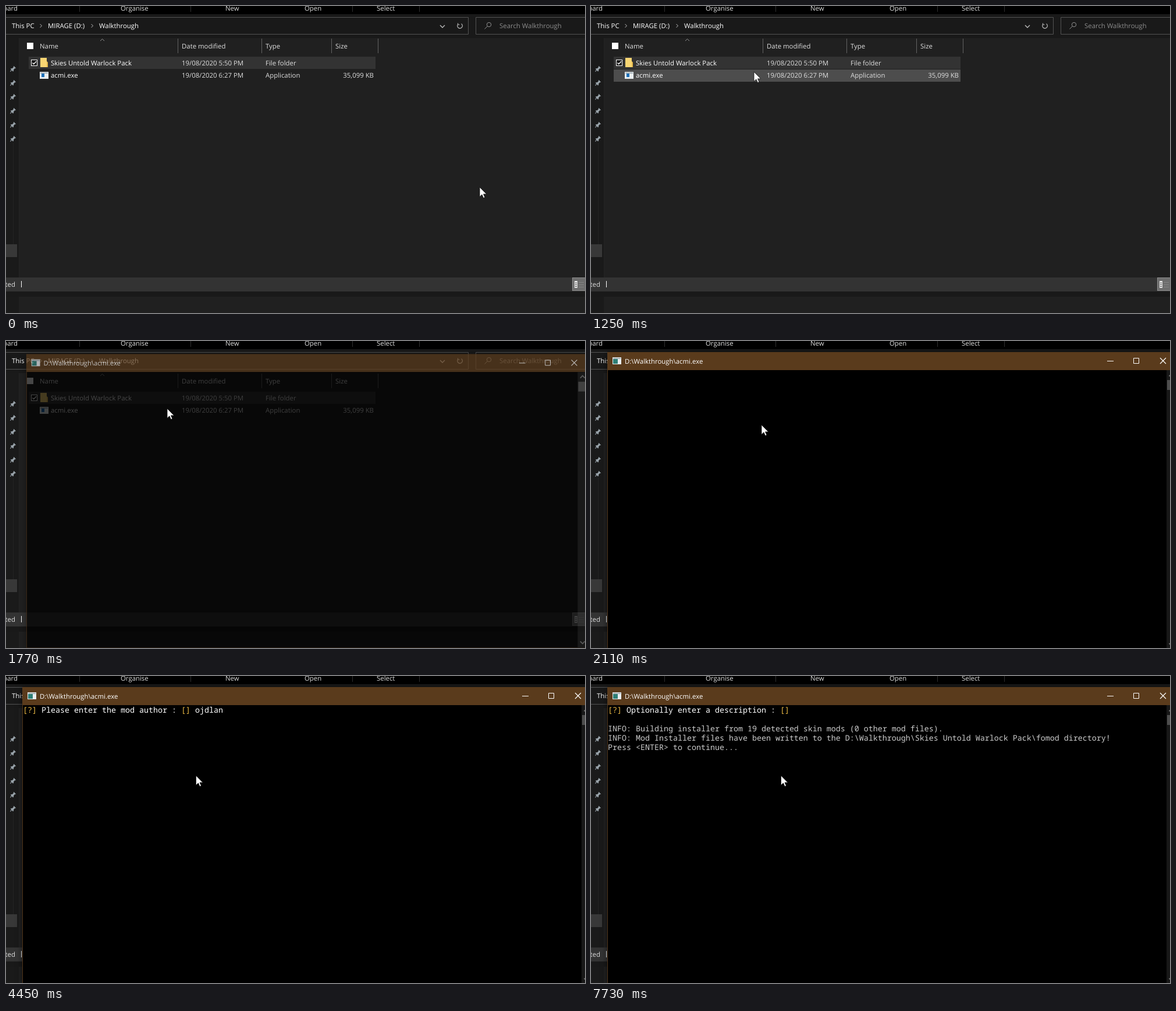
An HTML page for the animation above (8000 ms loop, 995x527 px).

```html
<!DOCTYPE html>
<html lang="en">
<head>
<meta charset="utf-8">
<title>Installer walkthrough</title>
<style>
  html, body { margin: 0; width: 100%; height: 100%; overflow: hidden; background: #202020; }
  svg { display: block; width: 995px; height: 527px; }
  text { font: 11.4px "Open Sans", "Noto Sans", sans-serif; fill: #fff; white-space: pre; text-rendering: geometricPrecision; }
  .soft text, text.soft { fill: #dedede; }
  #lines text { font: 13.333px "Noto Sans Mono", "DejaVu Sans Mono", monospace; }
  .gold { fill: #efbd45; }
  .info { fill: #ccc; }
  .line { fill: none; stroke: #bbb; stroke-width: 1; }
</style>
</head>
<body>
<svg viewBox="0 0 995 527" xmlns="http://www.w3.org/2000/svg">
  <defs>
    <g id="pin" fill="#98a2a9">
      <path d="M1.5 -5L5 -1.5L4 -.7L3.3 -1L1.2 1.2L1 3.8L0 4.4L-4.2 .2L-3.5 -.8L-1 -1.1L1 -3.2L.7 -4.2Z"/>
      <path d="M-1.8 1.2L-4.6 4.6" stroke="#98a2a9" stroke-width="1.1"/>
    </g>
    <g id="app">
      <rect width="15" height="12" fill="#e9eef0"/>
      <rect x="1" y="1" width="13" height="2" fill="#a9b4ba"/>
    </g>
  </defs>

  <!-- file manager -->
  <rect width="995" height="527" fill="#202020"/>
  <rect width="995" height="55" fill="#191919"/>
  <rect width="995" height="14"/>
  <rect y="55" width="22" height="472" fill="#1a1a1a"/>
  <path d="M22.5 55V466M12.5 235V409" stroke="#242424"/>
  <g class="soft">
    <text x="20" y="8" text-anchor="end">Clipboard</text>
    <text x="197" y="8">Organise</text>
    <text x="377" y="8">New</text>
    <text x="513" y="8">Open</text>
    <text x="637" y="8">Select</text>
  </g>
  <path d="M126.5 0V10M317.5 0V10M595.5 0V10M710.5 0V10" stroke="#303030"/>
  <path d="M-1 19.5H794.5V48.5H-1M996 19.5H807.5V48.5H996" fill="none" stroke="#535353"/>
  <text x="10" y="38">This PC</text>
  <text x="72" y="38">MIRAGE (D:)</text>
  <text x="160" y="38">Walkthrough</text>
  <g class="line">
    <path d="M58.5 31L61.5 34L58.5 37M146.5 31L149.5 34L146.5 37"/>
    <path d="M746 33L750 37L754 33" stroke-width="1.4"/>
    <path d="M777 31A4.3 4.3 0 1 0 782.5 30.5M776.5 29.5V32H779.5" stroke-width="1.2"/>
    <circle cx="830" cy="32" r="3.7" stroke="#909090"/>
    <path d="M827.3 34.7L822.5 39.5" stroke="#909090"/>
    <path d="M162 60L165.5 56.5L169 60" stroke="#909090"/>
  </g>
  <text x="848" y="38" style="fill:#8c8c8c">Search Walkthrough</text>

  <rect x="36" y="63" width="11" height="11" fill="#fff"/>
  <g class="soft">
    <text x="58" y="73">Name</text>
    <text x="302" y="73">Date modified</text>
    <text x="446" y="73">Type</text>
    <text x="566" y="73">Size</text>
  </g>
  <path d="M295.5 56V81M439.5 56V81M559.5 56V81M639.5 56V81" stroke="#636363"/>

  <rect id="row1" x="39.5" y="87.5" width="595" height="20"/>
  <rect id="row2" x="39" y="109" width="596" height="21" fill="#4d4d4d"/>
  <rect x="43.5" y="92.5" width="10" height="10" fill="#111" stroke="#fff"/>
  <path d="M45.5 97.5L47.7 99.8L52 95" fill="none" stroke="#fff" stroke-width="1.4"/>
  <path d="M59 89H70V95L72 97V105H59Z" fill="#f9d673"/>
  <path d="M70 95L72 97V105H70Z" fill="#e5b94c"/>
  <use href="#app" x="58" y="113"/>
  <rect x="61" y="116" width="5" height="6" fill="#1d6fb8"/>
  <text x="77" y="102">Skies Untold Warlock Pack</text>
  <text x="77" y="123">acmi.exe</text>
  <g class="soft">
    <text x="302" y="102">19/08/2020 5:50 PM</text>
    <text x="446" y="102">File folder</text>
    <text x="302" y="123">19/08/2020 6:27 PM</text>
    <text x="446" y="123">Application</text>
    <text x="632" y="123" text-anchor="end">35,099 KB</text>
  </g>

  <g id="pins"></g>
  <rect y="409" width="19" height="22" fill="#383838"/>
  <rect y="466" width="995" height="24" fill="#333"/>
  <rect y="490" width="995" height="9" fill="#191919"/>
  <text class="soft" x="16" y="482" text-anchor="end">1 item selected</text>
  <path d="M26.5 472V483" stroke="#fff"/>
  <rect x="973.5" y="466.5" width="23" height="22" fill="#6d6d6d" stroke="#8c8c8c"/>
  <rect x="977" y="472" width="5" height="12" fill="#e4e4e4"/>
  <path d="M978 475.5H981M978 478.5H981M978 481.5H981" stroke="#444"/>
  <path d="M984 474.5H993M984 478.5H993M984 482.5H993" stroke="#858585"/>

  <!-- console -->
  <g id="win">
    <rect x="28" y="19" width="980" height="512" style="filter:drop-shadow(0 1px 6px rgba(0,0,0,.55))"/>
    <rect x="28.5" y="19.5" width="979" height="511" stroke="#50351a"/>
    <rect x="28" y="19" width="980" height="31" fill="#5a3b1c"/>
    <use href="#app" x="37" y="28"/>
    <rect x="38" y="31" width="8" height="8" fill="#2f7f76"/>
    <text x="58" y="39">D:\Walkthrough\acmi.exe</text>
    <g class="line" style="stroke:#fff">
      <path d="M887 34.5H898M932.5 29.5H941.5V38.5H932.5Z"/>
      <path d="M978 29L988 39M988 29L978 39" stroke-width="1.2"/>
    </g>
    <rect x="989" y="50" width="18" height="480" fill="#171717"/>
    <rect x="990" y="67" width="16" height="17" fill="#4d4d4d"/>
    <path d="M993.5 60.5L997.5 56.5L1001.5 60.5M993.5 519L997.5 523L1001.5 519" fill="none" stroke="#707070" stroke-width="1.8"/>
    <g id="lines"></g>
    <rect id="caret" y="62" width="8" height="4" fill="#f2f2f2"/>
  </g>

  <circle id="press" r="12" fill="#c9b722" opacity=".85"/>
  <path id="mouse" d="M0 0V16.5L3.9 12.8L6.5 18.6L9 17.5L6.5 11.9H11.8Z" fill="#fff" stroke="#111" stroke-width=".8"/>
</svg>

<script>
const LOOP = 8000, COL = 8, LEFT = 29;
const el = id => document.getElementById(id);
const show = (node, on) => node.setAttribute("visibility", on ? "visible" : "hidden");
const within = (t, a, b) => t >= a && t < b;
// last entry of a [time, ...values] table that has begun
const at = (table, t) => table.reduce((best, row) => row[0] <= t ? row : best);
const smooth = p => p * p * (3 - 2 * p);

const mouse = [[0, 814, 311]];
for (let k = 1; k <= 8; k++) {
  const p = smooth(k / 8);
  mouse.push([70 + (k - 1) * 77, 814 - 533 * p, 311 - 217 * p]);
}
mouse.push([1190, 280, 113], [1260, 277, 129], [1330, 277, 116],
  [1930, 280, 121], [2000, 286, 132], [2070, 293, 144], [2130, 300, 155], [2190, 306, 163],
  [2340, 315, 168], [2420, 323, 170], [2500, 326.5, 171]);

// time, scale, opacity
const opening = [[0, 1, 0], [1650, .961, .15], [1770, .986, .72], [1860, .996, .95], [1930, 1, 1]];

const ask = (label, preset = "") => `[?] ${label} : [${preset}] `;
const author = ask("Please enter the mod author");
const version = ask("Please enter a valid version number", "1.0.0");
const about = ask("Optionally enter a description");
const prompts = [
  [0, ""],
  [2130, ask("Please enter your mod name", "Skies Untold Warlock Pack")],
  [3270, ""], [3350, "[?]"], [3440, author],
  ...[3670, 3840, 3990, 4070, 4300, 4450].map((t, i) => [t, author + "ojdlan".slice(0, i + 1)]),
  [5060, ""], [5140, "[?]"], [5290, version],
  [6250, ""], [6330, about]
];
const carets = [[2130, 2730], [3190, 3270], [4980, 5060], [5290, 6070], [6330, 7090]];
const report = [
  [7490, "INFO: Building installer from 19 detected skin mods (0 other mod files)."],
  [7640, "INFO: Mod Installer files have been written to the D:\\Walkthrough\\Skies Untold Warlock Pack\\fomod directory!"],
  [7730, "Press <ENTER> to continue..."]
];

function svg(name, attrs, parent) {
  const node = document.createElementNS("http://www.w3.org/2000/svg", name);
  for (const key in attrs) node.setAttribute(key, attrs[key]);
  return parent.appendChild(node);
}

for (let i = 0; i < 6; i++) svg("use", { href: "#pin", x: 12, y: 108 + 24 * i }, el("pins"));

const promptLine = svg("text", { x: LEFT, y: 63 }, el("lines"));
const reportLines = report.map(([, words], i) => {
  const line = svg("text", { x: LEFT, y: 95 + 16 * i, class: "info" }, el("lines"));
  line.textContent = words;
  return line;
});

let shown = null;
function setPrompt(words) {
  if (words === shown) return;
  shown = words;
  promptLine.textContent = "";
  for (const part of words.split(/(\[\?\]|[\[\]])/).filter(Boolean))
    svg("tspan", /^[\[\]]/.test(part) ? { class: "gold" } : {}, promptLine).textContent = part;
}

function draw(t) {
  const [, x, y] = at(mouse, t);
  el("mouse").setAttribute("transform", `translate(${x} ${y})`);
  el("press").setAttribute("transform", `translate(${x - 1} ${y + 1})`);
  show(el("press"), within(t, 780, 1120) || within(t, 1480, 1560));

  const hover = t < 1650 && x < 635;
  const first = hover && y < 108;
  el("row1").setAttribute("fill", first ? "#777" : "#333");
  el("row1").setAttribute("stroke", first ? "#8c8c8c" : "#333");
  show(el("row2"), hover && y >= 108 && y < 131);

  const [, scale, alpha] = at(opening, t);
  el("win").setAttribute("transform", `translate(518 275) scale(${scale}) translate(-518 -275)`);
  el("win").setAttribute("opacity", alpha);

  const words = at(prompts, t)[1];
  setPrompt(words);
  el("caret").setAttribute("x", LEFT + COL * words.length);
  show(el("caret"), carets.some(([a, b]) => within(t, a, b)));
  reportLines.forEach((line, i) => show(line, t >= report[i][0]));
}

const start = performance.now();
function tick() {
  draw((performance.now() - start) % LOOP);
  requestAnimationFrame(tick);
}
tick();
</script>
</body>
</html>
```
